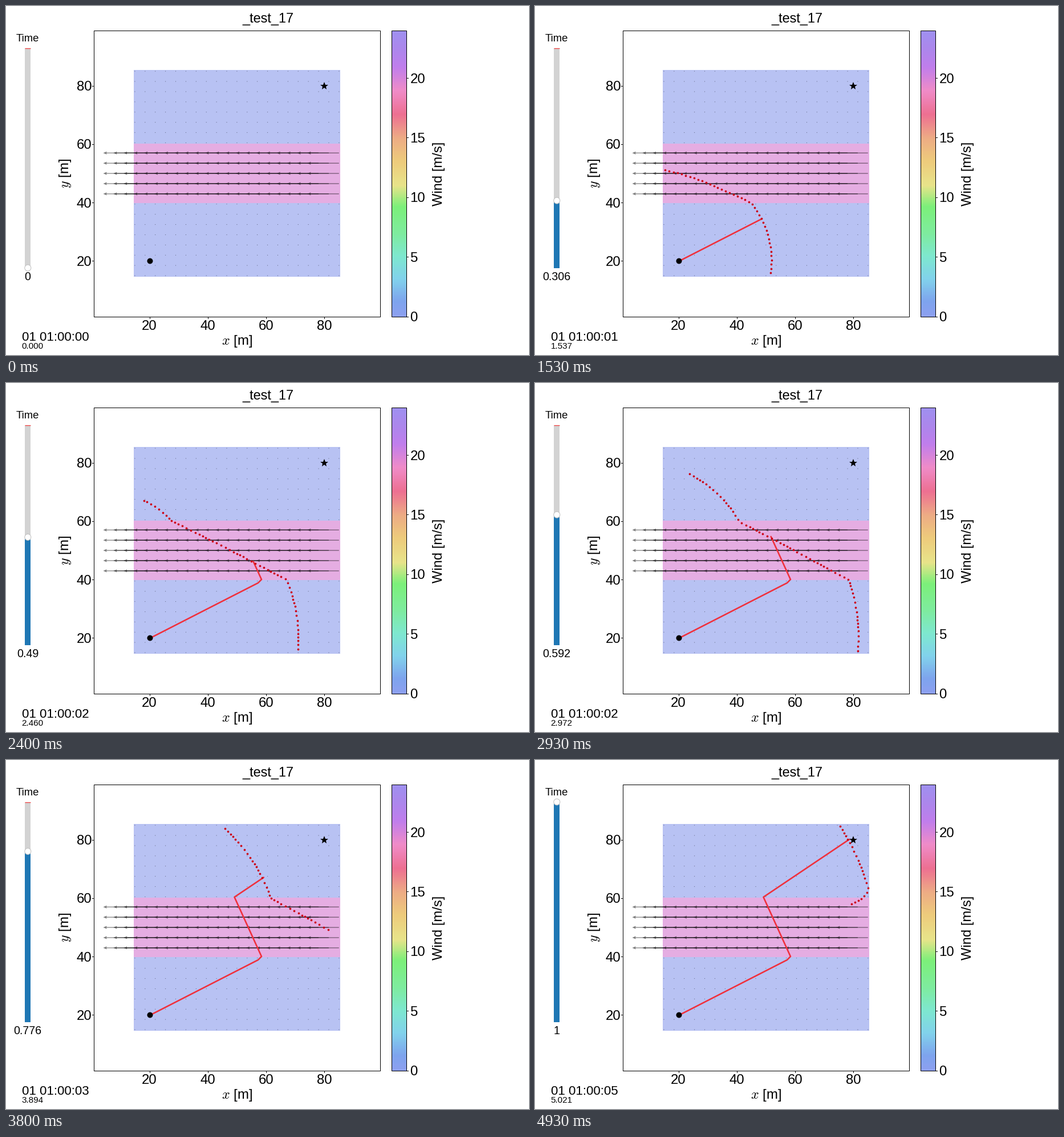
Animation of 917x611 px, one loop 5060 ms. Source, as a matplotlib script:

```python
import numpy as np
import matplotlib.pyplot as plt
from matplotlib.animation import FuncAnimation
from matplotlib.colors import LinearSegmentedColormap
from matplotlib.patches import Circle, Rectangle

WIDTH, HEIGHT, DPI = 917, 611, 64
PT = 72 / DPI                      # points per pixel
LOOP, STEP, LAST = 5060, 20, 49
END_TIME = 5.02149

# Wave front: air speed, band wind and domain limits in metres
AIR, WIND = 20.75, 19.5
LOW, HIGH = 15, 85
UNIT = 501 / 98
LEFT, RIGHT, TOP, BOTTOM = 154.4, 655.6, 42.6, 543.6
BAR_LEFT, BAR_RIGHT = 676, 701.6

plt.rcParams.update({"font.family": "Liberation Sans", "mathtext.fontset": "cm"})
fig = plt.figure(figsize=(WIDTH / DPI, HEIGHT / DPI), dpi=DPI, facecolor="white")
ax = fig.add_axes([0, 0, 1, 1])
ax.axis("off")


def px(x):
    return LEFT + (x - 1) * UNIT


def py(y):
    return BOTTOM - (y - 1) * UNIT


def label(x, y, text, size, ha="center", va="baseline", **kw):
    return ax.text(x, y, text, fontsize=size * PT, ha=ha, va=va, **kw)


def box(x0, y0, x1, y1, color, z=1):
    patch = Rectangle((x0, y0), x1 - x0, y1 - y0, fc=color, ec="none", zorder=z)
    return ax.add_patch(patch)


def outline(x0, y0, x1, y1):
    ax.add_patch(Rectangle((x0, y0), x1 - x0, y1 - y0, fill=False, ec="black",
                           lw=PT, zorder=9))


def tick(x0, y0, x1, y1):
    ax.plot([x0, x1], [y0, y1], color="black", lw=PT, zorder=9)


def draw_field():
    box(px(14.65), py(85.35), px(85.35), py(14.65), "#b8c2f3")
    box(px(14.65), py(60.15), px(85.35), py(39.85), "#e5ade2", 2)
    gx, gy = np.meshgrid(np.linspace(15, 85, 21), np.linspace(15, 85, 21))
    u = np.where((gy > 40) & (gy < 60), -55.5, 0)
    ax.quiver(px(gx), py(gy), u, 0 * u, units="dots", scale_units="dots", scale=1,
              width=1.25, headwidth=4.2, color="black", alpha=0.5, zorder=3)
    outline(LEFT, TOP, RIGHT, BOTTOM)
    for v in (20, 40, 60, 80):
        tick(px(v), BOTTOM, px(v), BOTTOM + 3.5)
        tick(LEFT - 3.5, py(v), LEFT, py(v))
        label(px(v), 566.6, str(v), 24)
        label(150.3, py(v) + 8.5, str(v), 24, "right")
    label(459, 29, "_test_17", 23.5)
    label(405, 587, "$x$ [m]", 24, va="center")
    label(104, 293, "$y$ [m]", 24, va="center", rotation=90)


def draw_colorbar():
    stops = [(0, "#8da0f0"), (1.2, "#7ea4ee"), (3.1, "#82d2ec"), (5, "#7ee8d0"),
             (6.9, "#7feca0"), (9.2, "#7cf07a"), (11, "#e8e48a"), (13.1, "#eecb7c"),
             (15, "#edac85"), (17, "#ed7092"), (19, "#f08cc8"), (21, "#c07eec"),
             (22.4, "#ae86ec"), (24, "#a090f0")]
    cmap = LinearSegmentedColormap.from_list("wind", [(v / 24, c) for v, c in stops])
    ax.imshow(np.linspace(0, 1, 256)[:, None], cmap=cmap, origin="lower",
              extent=(BAR_LEFT, BAR_RIGHT, BOTTOM, TOP), aspect="auto", zorder=1)
    outline(BAR_LEFT, TOP, BAR_RIGHT, BOTTOM)
    for v in range(0, 25, 5):
        y = BOTTOM - v * (BOTTOM - TOP) / 24
        tick(BAR_RIGHT, y, BAR_RIGHT + 3.5, y)
        label(708.5, y + 8.5, str(v), 24, "left")
    label(759, 294, "Wind [m/s]", 23.7, va="center", rotation=90)


def ray_front(t):
    """Front of rays leaving (20, 20), refracted by the wind band 40 < y < 60."""
    angle = np.linspace(-180, 180, 3601)
    c, s = np.cos(np.radians(angle)), np.sin(np.radians(angle))
    enter = 20 / (AIR * np.maximum(s, 1e-6))
    x_in = 20 + AIR * c * enter
    k = c / (1 + c * WIND / AIR)
    drag = 0.9 + 0.085 * s * s     # flat rays lose more speed in the band
    vx = drag * (AIR * k - WIND)
    vy = drag * AIR * np.sqrt(np.maximum(1 - k * k, 1e-6))
    cross = 20 / vy
    free = np.minimum(t, enter) + np.maximum(t - enter - cross, 0)
    inside = np.clip(t - enter, 0, cross)
    x = 20 + AIR * c * free + vx * inside
    y = 20 + AIR * s * free + vy * inside
    ok = (x > LOW) & (x < HIGH) & (y > LOW) & (y < HIGH)
    ok &= (t < enter) | (x_in < HIGH)
    ok &= (t < enter + cross) | (x_in + vx * cross > LOW)
    return x[ok], y[ok], angle[ok]


def tail_curve(t, head):
    """Curve that trails behind the last ray at the right border."""
    times = (3.484, 4.304, END_TIME)
    tip = np.array([np.interp(t, times, (84, 80, 78.7)),
                    np.interp(t, times, (43, 54.6, 57.7))])
    bend = np.array([np.interp(t, times, (84, 78.5, 85.2)),
                     np.interp(t, times, (43, 55.7, 60.5))])
    q = np.linspace(0, 1, 40, endpoint=False)[:, None]
    return ((1 - q) ** 2 * tip + 2 * q * (1 - q) * bend + q * q * head).T


def front_dots(t):
    if t == 0:
        return [], []
    x, y, angle = ray_front(t)
    anchor = np.argmin(abs(angle - 27))
    if t > 3.484:
        tx, ty = tail_curve(t, np.array([x[0], y[0]]))
        x, y = np.r_[tx, x], np.r_[ty, y]
        anchor += len(tx)
    x, y = px(x), py(y)
    length = np.r_[0, np.cumsum(np.hypot(np.diff(x), np.diff(y)))]
    gap = min(AIR * UNIT * t * np.radians(4.5), 7.5)
    k = np.arange(np.ceil(-length[anchor] / gap),
                  np.floor((length[-1] - length[anchor]) / gap) + 1)
    pos = length[anchor] + k * gap + 2.2 * np.sin(7 * k) * np.clip(t - 1.6, 0, 1)
    return np.interp(pos, length, x), np.interp(pos, length, y)


ROUTE_T = np.array([0, 2.0, 2.09, 3.31, END_TIME])
ROUTE_X = np.array([252, 442, 448, 400.5, 551])
ROUTE_Y = np.array([447, 350, 344, 240, 139])


def route_until(t):
    done = ROUTE_T < t
    return (np.r_[ROUTE_X[done], np.interp(t, ROUTE_T, ROUTE_X)],
            np.r_[ROUTE_Y[done], np.interp(t, ROUTE_T, ROUTE_Y)])


def short_number(v):
    return next(f"{v:.{d}f}" for d in range(4) if abs(v - round(v, d)) < 1e-3)


draw_field()
draw_colorbar()

route, = ax.plot([], [], color="#f0303c", lw=2.6 * PT, zorder=5,
                 solid_capstyle="round", solid_joinstyle="round")
dots, = ax.plot([], [], "o", color="#cc0014", ms=3.7 * PT, mew=0, zorder=6)
ax.plot(px(20), py(20), "o", color="black", ms=10 * PT, mew=0, zorder=7)
ax.plot(px(80), py(80), "*", color="black", ms=14.5 * PT, mew=0, zorder=7)

FULL, EMPTY = 73.5, 458.5
box(33, FULL, 43, EMPTY, "#d3d3d3")
ax.plot([33, 43], [FULL, FULL], color="#f04040", lw=1.3 * PT, zorder=3,
        solid_capstyle="butt")
fill = box(33, EMPTY, 43, EMPTY, "#1f77b4", 2)
knob = ax.add_patch(Circle((38.3, EMPTY), 5.5, fc="white", ec="#bfbfbf", lw=PT,
                           zorder=4))
label(38, 62, "Time", 18.5)
value = label(38, 480, "0", 19.6)
clock = label(27.5, 586.5, "", 22.3, "left")
seconds = label(27.5, 600, "", 15.2, "left")

ax.set_xlim(0, WIDTH)
ax.set_ylim(HEIGHT, 0)


def update(frame):
    ms = frame * STEP + STEP // 2
    # pictures last 130 and 70 ms in turn
    index = min(2 * (ms // 200) + (ms % 200 >= 130), LAST)
    v = index / LAST
    t = END_TIME * v
    route.set_data(*route_until(t))
    dots.set_data(*front_dots(t))
    level = EMPTY + (FULL - EMPTY) * v
    fill.set_y(level)
    fill.set_height(EMPTY - level)
    knob.center = (38.3, level)
    value.set_text(short_number(v))
    clock.set_text(f"01 01:00:{int(t):02d}")
    seconds.set_text(f"{t:.3f}")
    return route, dots, fill, knob, value, clock, seconds


anim = FuncAnimation(fig, update, frames=LOOP // STEP, interval=STEP, repeat=True,
                     repeat_delay=0)
plt.show()
```
